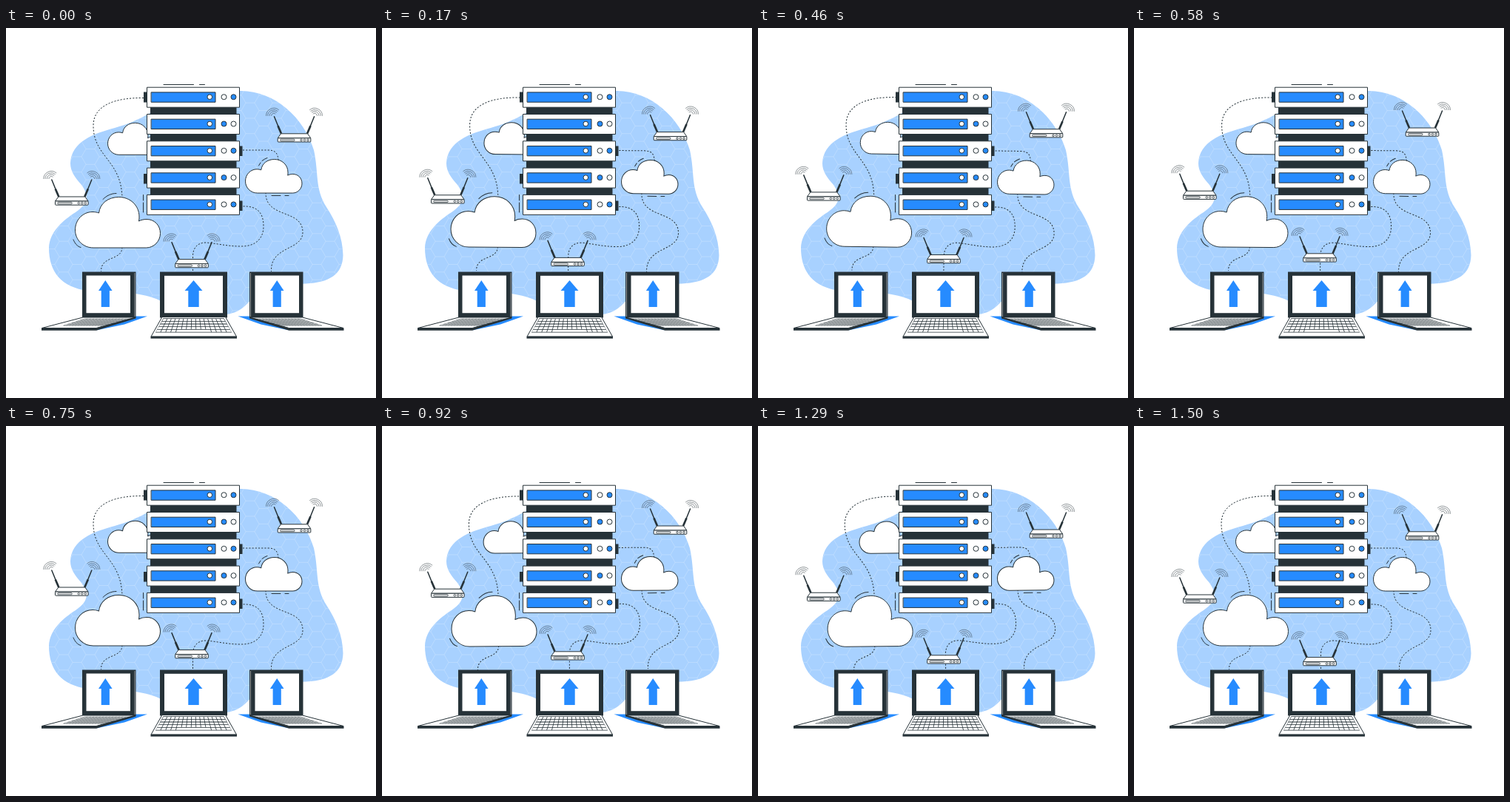
Recreate the animation shown at these times as an HTML page. Size 500 px wide and 500 px high, loop 1.54 s.

```html
<!DOCTYPE html>
<html lang="en">
<head>
<meta charset="utf-8">
<title>Cloud hosting</title>
<style>
  html, body { margin: 0; width: 100%; height: 100%; overflow: hidden; background: #fff; }
  svg { display: block; width: 100vw; height: 100vh; }
  .ink { fill: none; stroke: #263238; stroke-width: 1; stroke-linecap: round; stroke-linejoin: round; }
  .box { fill: #fff; stroke: #263238; stroke-width: 1; stroke-linejoin: round; }
  .dark { fill: #263238; }
  .blue { fill: #268bff; }
  .dash { stroke-dasharray: 2.1 2.1; stroke-linecap: butt; }
  .wave { fill: none; stroke: #263238; stroke-width: .6; opacity: .85; }
  .keys { fill: none; stroke: #263238; stroke-width: .5; }
</style>
</head>
<body>
<svg id="stage" viewBox="0 0 500 500" xmlns="http://www.w3.org/2000/svg"></svg>
<script>
const LOOP = 1540, CYCLE = 1500, STEP = 1000 / 24;
const range = n => [...Array(n).keys()];
const mix = (a, b, k) => a + (b - a) * k;
const path = (cls, d, more = '') => `<path class="${cls}" d="${d}" ${more}/>`;
const rect = (cls, x, y, w, h, more = '') =>
  `<rect class="${cls}" x="${x}" y="${y}" width="${w}" height="${h}" ${more}/>`;
const dot = (cls, x, y, r, more = '') => `<circle class="${cls}" cx="${x}" cy="${y}" r="${r}" ${more}/>`;
const move = (x, y, body, k = 1) => `<g transform="translate(${x} ${y}) scale(${k})">${body}</g>`;

const BLOB = 'M316 85C362 84 403 121 416 165C423 197 417 216 433 242C446 262 455 283 455.5 307' +
  'C455 333 437 344 405 345.5C372 347 352 350 334 364C325 374 315 386 296 387C255 390 225 376 203 366' +
  'C180 357 150 356 110 355C75 350 58 330 58 297C59 275 77 260 94 249C112 237 112 226 102 212' +
  'C94 203 87 194 87 183C88 154 117 143 147 135C182 125 196 113 220 101C250 87 285 84 316 85Z';
const CLOUD = 'M24.5 68.5C10.5 68.5 0 57.5 0 44.5C0 30.5 10.5 20 23.5 20' +
  'C26.5 20 29.5 20.5 32 21.5C33.5 8.5 44.5 0 59 0C74.5 0 86.5 11.5 86.5 26.5' +
  'C86.5 28.5 86.5 30.5 86 32.5C88.5 31 92.5 30 96.5 30C107.5 30 115 38.5 115 49' +
  'C115 59.5 106.5 68.5 96 68.5Z';

function honeycomb(s = 12) {
  const h = s * Math.sqrt(3);
  let d = '';
  for (let c = 0; c < 26; c++)
    for (let r = 0; r < 17; r++) {
      const x = 42 + c * s * 1.5, y = 70 + (r + c % 2 / 2) * h;
      d += `M${x + s / 2} ${y - h / 2}h${-s}l${-s / 2} ${h / 2}l${s / 2} ${h / 2}`;
    }
  return `<path d="${d}" clip-path="url(#blob)" fill="none" stroke="#fff" stroke-width=".6" opacity=".35"/>`;
}

const cloud = (x, y, k) => move(x, y, path('box', CLOUD, 'vector-effect="non-scaling-stroke"'), k);

const sky = () =>
  path('ink dash', 'M186 94.5C148 94 118 104 118 132C118 175 157 178 157 232') +
  path('ink dash', 'M157 296C157 315 128 307 128.5 329') +
  path('ink dash', 'M320 165H354C364 165 368 169 368 181') +
  path('ink dash', 'M351 222C350 258 401 244 401 276C401 301 357 294 358.5 329') +
  path('ink dash', 'M252.5 328V310C252 297 259 290 270 290C285 291 298 295 318 295' +
    'C338 295 348 284 348 268C348 250 340 240 319 241') +
  cloud(137.5, 128.3, .628) + cloud(93.5, 228.5, 1) + cloud(323.5, 177.5, .665) +
  path('ink', 'M131 231.5C136 226.5 142 223.5 149 223.5M91 286C93 291 96 295 101 296.5') +
  path('ink', 'M341.5 186L344 182M346 179.5Q349 177 353 175.5M359 226.5H371M377 226.5H382');

function server(i) {
  const y = 80.2 + i * 36.3, odd = i % 2;
  return rect('box', 190.5, y, 125, 27) +
    rect('ink', 196.5, y + 6.7, 86.5, 13.3, 'style="fill:#268bff"') +
    dot('box', 275.3, y + 13, 3.3) +
    dot('box', 294.5, y + 13, 3.5, odd ? 'style="fill:#268bff"' : '') +
    dot('box', 307.5, y + 13, 3.5, odd ? '' : 'style="fill:#268bff"');
}

const rack = () =>
  rect('dark', 195, 100, 116.5, 140) +
  rect('dark', 186, 86.5, 5, 14) + rect('dark', 186, 197, 5, 13.5) +
  rect('dark', 315, 159.5, 4.5, 13.5) + rect('dark', 315, 233.5, 4.5, 13.5) +
  range(5).map(server).join('') +
  path('ink', 'M213 76.5H253.5M261.5 76.5H268.5M185.5 225.5V233M185.5 236V249');

// Router drawn around the centre of its front panel's top edge.
function router(x, y) {
  const antenna =
    path('ink', 'M-17.5 -6L-22 -16.5', 'style="stroke-width:2.7;stroke-linecap:butt"') +
    path('ink', 'M-21.5 -15.5L-27 -29', 'style="stroke-width:1.5"') +
    [3.5, 6, 8.3, 10.5].map(r => path('wave',
      `M${-27.5 - r} -30A${r} ${r} 0 0 1 ${-27.5 + r * .65} ${-30 - r * .76}`)).join('');
  return move(x, y, antenna + `<g transform="scale(-1 1)">${antenna}</g>` +
    path('box', 'M-18 -6H18L22.3 0H-22.3Z') +
    rect('box', -22.3, 0, 44.6, 5.2, 'rx=".8"') +
    rect('box', -19, 1.5, 19.5, 2.3, 'rx="1.1" style="stroke-width:.8"') +
    [9.5, 14, 18.5].map(cx => dot('box', cx, 2.6, 1.3, 'style="stroke-width:.8"')).join(''));
}

const arrow = (x, w) => path('blue',
  `M${x} 341L${x + w} 355H${x + w * .6}V377H${x - w * .6}V355H${x - w}Z`);

function sideLaptop() {
  const at = (u, v) => `${mix(mix(106, 167, u), mix(72, 125, u), v)} ${mix(393, 404, v)}`;
  const lines = range(6).map(i => `M${at(0, i / 6)}L${at(1, i / 6)}`).join('') +
    range(15).map(i => `M${at(i / 14, 0)}L${at(i / 14, .84)}`).join('');
  return path('blue', 'M122 408.5L160 400.5L191 389.5H172Z') +
    path('dark', 'M103 329.5H175.5V391H103Z') +
    path('box', 'M174 331V390', 'style="stroke:#fff;stroke-width:.5"') +
    rect('box', 108.5, 334.5, 59.5, 50.7, 'style="stroke:none"') +
    path('box', 'M104 391H175L122 405.5H48.5Z') +
    path('keys', lines, 'opacity=".8"') +
    path('dark', 'M48 405.5H122L175.5 390.5V392.5L122 408.7H48Z');
}

function frontLaptop() {
  const edge = y => 15 * (y - 391) / 26;
  const row = i => {
    const y = 393 + i * 3.7, b = y + 2.9, l = 213.5 - edge(y), lb = 213.5 - edge(b);
    const key = (p, q) => {
      const a = p / 15, z = q / 15, r = 507 - l, rb = 507 - lb;
      return `M${mix(l, r, a) + .4} ${y}H${mix(l, r, z) - .4}L${mix(lb, rb, z) - .4} ${b}H${mix(lb, rb, a) + .4}Z`;
    };
    if (i < 4) return range(15).map(k => key(k, k + 1)).join('');
    return range(4).map(k => key(k, k + 1) + key(k + 11, k + 12)).join('') + key(4, 11);
  };
  return rect('dark', 208, 329.5, 91, 62) +
    rect('box', 214, 334.8, 79, 50.4, 'style="stroke:none"') +
    path('box', 'M211 390.5H296.5L311.5 417H196Z') +
    path('dark', 'M212.5 392.3H294.5L305 411.5H202Z') +
    `<path d="${range(5).map(row).join('')}" fill="#fff"/>` +
    rect('dark', 195.5, 416.8, 116.5, 2.8);
}

const stage = document.getElementById('stage');
stage.innerHTML =
  `<clipPath id="blob"><path d="${BLOB}"/></clipPath>` +
  `<path d="${BLOB}" fill="#a8d1ff"/>` + honeycomb() +
  `<g id="sway">${sky()}</g>` + rack() +
  sideLaptop() + `<g transform="matrix(-1 0 0 1 504.5 0)">${sideLaptop()}</g>` + frontLaptop() +
  arrow(134.3, 9.3) + arrow(253.5, 12) + arrow(366.2, 9.3) +
  `<g id="float">${router(88.8, 234) + router(251, 318.6) + router(389.5, 148.8)}</g>`;

const sway = document.getElementById('sway'), float = document.getElementById('float');

// Linear triangle wave: 0, 1 at a quarter, -1 at three quarters, 0.
const swing = p => p < .25 ? 4 * p : p < .75 ? 2 - 4 * p : 4 * p - 4;

function draw(now) {
  const tick = Math.floor(now % LOOP / STEP + .1);
  const p = tick * STEP / CYCLE % 1;
  sway.setAttribute('transform', `rotate(${swing(p)} 247 211)`);
  float.setAttribute('transform', `translate(0 ${-10 * (1 - Math.abs(1 - 2 * p))})`);
}

const start = performance.now();
function loop() {
  draw(performance.now() - start);
  requestAnimationFrame(loop);
}
loop();
</script>
</body>
</html>
```
